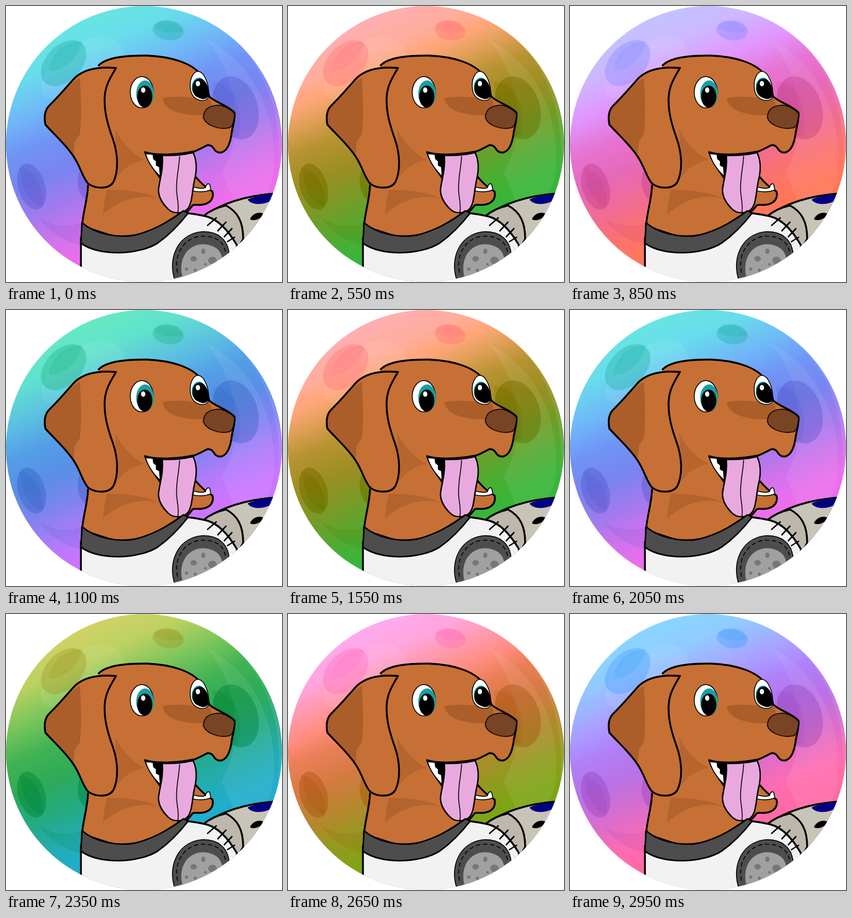
These frames come from a looping animation (512 px wide and 512 px high, 3 s). An HTML page:

```html
<!DOCTYPE html>
<html lang="en">
<head>
<meta charset="utf-8">
<title>Dog and colour-shifting moon</title>
<style>
  html, body { margin: 0; width: 100%; height: 100%; overflow: hidden; background: #fff; }
  svg { position: absolute; left: 0; top: 0; width: 100vw; height: 100vh; }
  .moon { animation: hue 3s linear infinite; }
  .ink { fill: none; stroke: #000; stroke-width: 3.4; stroke-linecap: round; stroke-linejoin: round; }
  .thin { stroke-width: 1.6; }
  .fur { fill: #c67035; }
  .shade { fill: #ab5e2a; }
  /* holds for one step, then turns 18 degrees every 50 ms */
  @keyframes hue {
    0% { filter: hue-rotate(0deg); }
    1.66667% { filter: hue-rotate(0deg); animation-timing-function: steps(59, end); }
    100% { filter: hue-rotate(-1062deg); }
  }
</style>
</head>
<body>
<svg class="moon" viewBox="0 0 512 512">
  <defs>
    <linearGradient id="sky" gradientUnits="userSpaceOnUse" x1="0" y1="0" x2="240" y2="552">
      <stop offset=".12" stop-color="#68e6e0"/>
      <stop offset=".23" stop-color="#68dcec"/>
      <stop offset=".34" stop-color="#70b6f8"/>
      <stop offset=".43" stop-color="#7094f6"/>
      <stop offset=".53" stop-color="#7884f0"/>
      <stop offset=".63" stop-color="#a27aee"/>
      <stop offset=".72" stop-color="#cf73ec"/>
      <stop offset=".8" stop-color="#eb6eec"/>
      <stop offset="1" stop-color="#f06ce4"/>
    </linearGradient>
    <clipPath id="disc"><circle cx="256" cy="256" r="256"/></clipPath>
  </defs>
  <g clip-path="url(#disc)">
    <rect width="512" height="512" fill="url(#sky)"/>
    <g fill="#fff">
      <path opacity=".07" d="M372 62C455 105 503 190 497 305C490 350 470 380 440 400L400 310C445 230 430 135 372 62Z"/>
      <path opacity=".08" d="M440 80C500 150 520 250 498 350L512 350V80Z"/>
      <path opacity=".07" d="M150 62C190 45 222 65 220 100L120 165C85 180 65 175 65 145C80 105 110 75 150 62Z"/>
    </g>
    <g fill="#14a49a" fill-opacity=".32">
      <ellipse cx="107" cy="106" rx="50" ry="33" transform="rotate(-46 107 106)"/>
      <ellipse cx="301" cy="45" rx="29" ry="18.500" transform="rotate(8 301 45)"/>
      <path d="M80 121C84 88 108 65 141 66C137 92 112 120 80 121Z" fill-opacity=".2"/>
      <path d="M274 37C290 22 322 28 328 47C310 52 286 50 274 37Z" fill-opacity=".2"/>
    </g>
    <g fill="#3c3cb4" fill-opacity=".27">
      <ellipse cx="426" cy="189" rx="41" ry="60" transform="rotate(-18 426 189)"/>
      <ellipse cx="47.500" cy="335" rx="25" ry="44" transform="rotate(-17 47.500 335)"/>
      <ellipse cx="157" cy="325" rx="24" ry="38"/>
      <path d="M382 141C423 142 443 188 431 244C408 238 385 190 382 141Z" fill-opacity=".1"/>
      <path d="M27 299C55 305 72 340 68 374C40 362 28 336 27 299Z" fill-opacity=".12"/>
      <path d="M62 394C92 410 118 411 140 402V444C108 437 82 421 62 394Z" fill-opacity=".1"/>
    </g>
  </g>
</svg>

<svg viewBox="0 0 512 512">
  <g clip-path="url(#disc)">
    <!-- arm -->
    <g class="ink">
      <path fill="#c8c4b8" d="M366 390C400 366 445 352 497 348L515 380L440 470L400 430Z"/>
      <path fill="#bdb7ac" d="M366 390C378 380 394 373 408 370C431 382 440 402 440 432L430 450Z"/>
    </g>
    <path fill="#000082" d="M448 359C462 352 480 350 497 349L491 362C474 370 455 369 448 359Z"/>
    <path d="M453 394C458 385 469 381 477 385C477 393 462 400 453 396Z"/>

    <!-- suit -->
    <path class="ink" style="fill:#f2f2f2" d="M139 430V520H440L428 443C415 421 397 398 374 391C360 387 348 386 336 384Z"/>
    <path class="ink" style="stroke-width:2.600" d="M390 393L374 407M408 401L393 417M419 413L405 428M424 429L411 437"/>
    <path class="ink thin" style="fill:#4d4d4d" d="M313 508C300 470 317 425 360 419C393 416 413 434 414 463L394 483L336 506Z"/>
    <path class="ink thin" stroke-dasharray="7 6" d="M318 494C311 462 329 430 362 427C387 426 403 436 407 455"/>
    <path fill="#a0a0a0" d="M327 502C320 473 333 445 362 442C384 441 399 452 401 468C393 483 363 495 327 502Z"/>
    <g fill="#777">
      <ellipse cx="348" cy="469" rx="6" ry="5"/>
      <ellipse cx="383" cy="472" rx="8" ry="7"/>
      <ellipse cx="366" cy="455" rx="4" ry="5"/>
      <circle cx="335" cy="488" r="3"/>
      <circle cx="351" cy="490" r="3"/>
      <circle cx="370" cy="479" r="2.500"/>
    </g>

    <!-- head and neck -->
    <path class="ink" style="fill:#c67035" d="M172 110C188 94 225 92 262 92C308 94 345 106 362 128C372 142 374 155 377 168C390 180 410 183 424 198C425 214 419 227 418 240C415 258 409 271 397 272C383 271 388 258 374 258C364 263 356 268 346 271L351 316C361 328 372 338 383 344C386 356 380 368 360 369C352 369 348 368 346 370C342 376 338 380 332 385L245 442L141 408C143 382 152 355 152 333"/>
    <path class="shade" opacity=".55" d="M203 228C214 253 232 272 258 286C236 289 214 302 203 325C208 300 207 275 203 258Z"/>
    <path class="shade" opacity=".7" d="M187 341C220 340 258 345 284 357C244 348 212 360 180 386C181 370 184 356 187 341Z"/>
    <path class="shade" d="M290 171C315 165 352 170 378 174C386 182 379 194 366 203C340 203 296 200 290 171Z"/>
    <path class="ink thin" style="fill:#794423" d="M366 207C367 190 378 184 397 184C410 187 421 195 424 200C423 214 420 225 414 226C395 230 371 222 366 207Z"/>

    <!-- ear -->
    <path class="fur" d="M204 115C170 112 145 117 128 133C112 150 98 168 79 186C70 196 71 209 73 220C91 240 112 258 126 280C138 298 142 318 152 329C164 339 190 341 199 327C210 304 207 272 198 246C188 218 182 196 183 170C184 147 194 132 204 115Z"/>
    <path class="shade" d="M137 133C139 165 141 205 137 238L128 251L125 278C112 257 91 240 73 220C71 208 70 197 79 186C98 172 110 150 137 133Z"/>
    <path class="ink" d="M204 115C170 112 145 117 128 133C112 150 98 168 79 186C70 196 71 209 73 220C91 240 112 258 126 280C138 298 142 318 152 329C164 339 190 341 199 327C210 304 207 272 198 246C188 218 182 196 183 170C184 147 194 132 204 115Z"/>

    <!-- eyes -->
    <ellipse class="ink thin" style="fill:#fff" cx="252" cy="160" rx="21.500" ry="29"/>
    <ellipse cx="258" cy="163" rx="16.500" ry="25" fill="#16a0a4"/>
    <ellipse cx="257.500" cy="168" rx="14" ry="20.500"/>
    <ellipse cx="254.500" cy="156" rx="4" ry="5" fill="#fff"/>
    <path class="ink thin" style="fill:#fff" d="M342 153C340 136 347 122 356 121C368 122 377 145 376 166C376 174 368 176 361 175C350 173 343 165 342 153Z"/>
    <ellipse cx="358" cy="151" rx="13.500" ry="18" fill="#16a0a4"/>
    <path d="M346 153C346 139 354 133 362 135C371 138 377 151 376 165C374 174 364 174 357 170C350 167 346 161 346 153Z"/>
    <ellipse cx="356" cy="144" rx="4" ry="5" fill="#fff"/>

    <!-- mouth -->
    <path class="ink" style="fill:#000" d="M258 271C275 277 312 277 348 270L330 310L286 319C276 304 265 293 258 271Z"/>
    <path fill="#fff" d="M260 275L272 276L273 284L278 288L278 296L284 299L285 314C275 304 265 291 260 275Z"/>
    <path class="ink thin" style="fill:#fff" d="M349 336C356 338 364 339 370 337C372 330 375 328 378 331L380 341C369 346 356 345 346 343Z"/>
    <path class="ink" style="fill:#e8aade;stroke-width:2.600" d="M290 277C310 278 330 276 347 272C354 286 354 305 350 322C345 342 346 366 337 376C328 386 309 386 300 376C290 366 282 353 283 339C286 318 292 302 290 277Z"/>
    <path class="ink thin" d="M322 279C321 302 314 325 317 348C318 360 321 370 319 382"/>

    <!-- collar -->
    <path class="ink" style="fill:#4d4d4d;stroke-width:2.800" d="M141 402C164 422 204 431 239 425C277 416 307 396 329 380L338 384C325 401 304 424 281 440C248 461 175 466 139 440Z"/>
  </g>
</svg>
</body>
</html>
```
